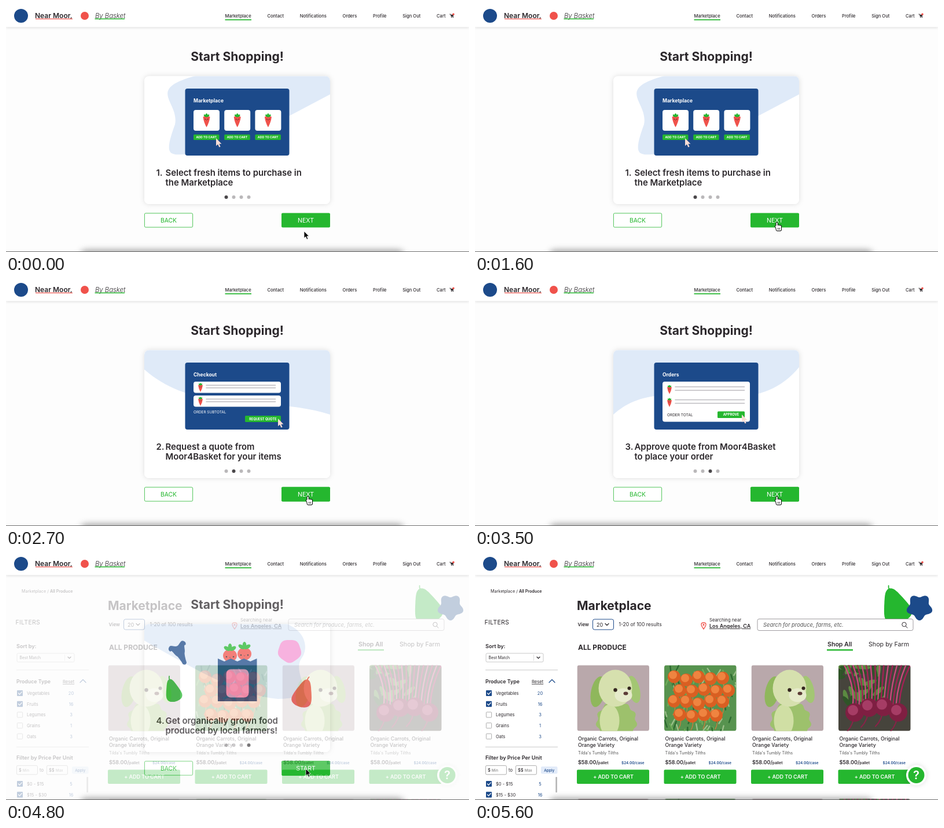
Recreate the animation shown at these times as an HTML page. Size 800 by 426 pixels, loop 5700 ms.

```html
<!DOCTYPE html>
<html lang="en">
<head>
<meta charset="utf-8">
<title>Shopping guide</title>
<style>
html, body { margin: 0; width: 100%; height: 100%; overflow: hidden; background: #fdfdfd; }
svg { display: block; width: 100vw; height: 100vh; font-family: Inter, "Open Sans", sans-serif; }
text { white-space: pre; }
.bar { filter: drop-shadow(0 1px 2px rgba(0,0,0,.14)); }
.card { filter: drop-shadow(0 0 4px rgba(0,0,0,.13)); }
.soft { filter: blur(6px); }
</style>
</head>
<body>
<svg id="stage" viewBox="0 0 800 426"></svg>
<script>
const GREEN = '#25b72f', NAVY = '#1c4a8a', RED = '#f0524b', SKY = '#dfeaf8', PINK = '#f598d5', INK = '#2b272b';
const { sin, cos, abs, min, max, sign, floor, PI } = Math;

// Drawing helpers
const range = n => [...Array(n).keys()];
const each = (list, fn) => (typeof list === 'number' ? range(list) : list).map(fn).join('');
const random = seed => abs(sin(seed * 12.9898) * 43758.5453) % 1;
const text = (x, y, size, weight, str, fill = INK, more = '') =>
  `<text x="${x}" y="${y}" font-size="${size}" font-weight="${weight}" fill="${fill}" ${more}>${str}</text>`;
const mid = (x, y, size, weight, str, fill) => text(x, y, size, weight, str, fill, 'text-anchor="middle"');
const box = (x, y, w, h, fill, r = 0, more = '') =>
  `<rect x="${x}" y="${y}" width="${w}" height="${h}" rx="${r}" fill="${fill}" ${more}/>`;
const frame = (x, y, w, h, stroke, r = 2, width = .8) =>
  box(x, y, w, h, '#fff', r, `stroke="${stroke}" stroke-width="${width}"`);
const path = (d, fill, more = '') => `<path d="${d}" fill="${fill}" ${more}/>`;
const line = (d, stroke, width = 1) =>
  path(d, 'none', `stroke="${stroke}" stroke-width="${width}" stroke-linecap="round" stroke-linejoin="round"`);
const oval = (x, y, rx, ry, fill, more = '') => `<ellipse cx="${x}" cy="${y}" rx="${rx}" ry="${ry}" fill="${fill}" ${more}/>`;
const dot = (x, y, r, fill, more) => oval(x, y, r, r, fill, more);
const put = (x, y, inner, turn = 0, scale = 1) =>
  `<g transform="translate(${x} ${y}) rotate(${turn}) scale(${scale})">${inner}</g>`;
const chevron = (x, y, w, stroke = INK, up = 1) =>
  line(`M${x - w} ${y - w * up / 2}l${w} ${w * up} ${w} ${-w * up}`, stroke, 1.2);

// Closed outlines traced from a function of the angle
const outline = fn => 'M' + range(90).map(i => fn(i / 45 * PI).map(v => v.toFixed(1))).join('L') + 'Z';
const ruffle = (r, wave, petals, fill) => path(outline(a => {
  const k = r + wave * sin(petals * a);
  return [k * cos(a), k * sin(a)];
}), fill);
const pear = (w, h, fill) => path(outline(a =>
  [w / 1.4 * sin(a) * (.68 - .34 * cos(a) + .1 * cos(2 * a)), -h / 2 * cos(a)]), fill) +
  line(`M0 ${2 - h / 2}q-1 -4 1 -7`, fill, 1.8);
const trumpet = (w, h, fill) => path(outline(a => {
  const open = ((1 + cos(a)) / 2) ** 2;
  return [w / 2 * (.2 + .8 * open) * sign(sin(a)) * min(1, 2 * abs(sin(a))), -h / 2 * cos(a) + 3 * open * cos(9 * a)];
}), fill);

// Small illustrations
const leaves = (y, size, spread) => each([-1, 0, 1], n =>
  put(0, y, oval(0, -size, size * .55, size, GREEN), n * spread));
const face = (w, y) => dot(-w, y, w / 6 + .3, INK) + dot(w, y, w / 6 + .3, INK) + line(`M-1 ${y + 1}q1 1.5 2 0`, INK, .6);
const carrot = (x, y, scale) => put(x, y,
  path('M-6-5Q0-9 6-5 5 4 0 13-5 4-6-5Z', RED) + leaves(-5, 3, 50) + face(2.2, -1), 0, scale);
const berry = (x, y) => put(x, y, oval(0, 2, 12, 11, RED) + leaves(-7, 6, 58) + face(6, 4));
const ARROW = 'M0 0V12L2.8 9.6 4.9 14.2 6.9 13.3 4.9 8.8H8.6Z';
const pointer = (x, y) => put(x, y, path(ARROW, '#f8ddd6'), 0, 1.1);
const handShape = each(4, i => box(2 + 2.1 * i, i ? 4 + i * .4 : 0, 2.2, 8, '#fff', 1.1)) +
  box(2, 7, 8.5, 7, '#fff', 2) + put(0, 6, box(0, 0, 2.4, 6, '#fff', 1.2), -25);
const hand = `<g stroke="#000" stroke-width="1.8">${handShape}</g>${handShape}` +
  each(3, i => line(`M${4.6 + 1.7 * i} 9.5v2.6`, '#000', .6));

// Tutorial slides
const panel = title => box(309.5, 143, 180, 116, NAVY, 4) + text(324, 167, 8.5, 700, title, '#fff');
const tag = (x, y, w, h, size, str) =>
  box(x, y, w, h, GREEN, 1.5) + mid(x + w / 2, y + h / 2 + size * .36, size, 700, str, '#fff');
const item = (y, gap) => carrot(336, y, .66) + each([-.5, .5], n => line(`M346 ${y - 1 + n * gap}H465.5`, '#bdbbc0', 1.6));
const bagTop = range(7).map(i => `${366 + i * 11.25} ${i % 2 ? 186 : 181}`).join('L');

const slides = [
  {
    blob: 'M327 121C240 145 300 165 292 205 270 265 285 258 320 256 400 250 440 216 490 190L560 153V121Z',
    art: panel('Marketplace') + each(3, i => {
      const x = 324 + 53.2 * i;
      return box(x, 180, 45, 36, '#fff', 4) + carrot(x + 22.5, 197, 1) + tag(x, 222.5, 44.5, 9.5, 5.2, 'ADD TO CART');
    }) + pointer(363, 229),
    lines: ['Select fresh items to purchase in', 'the Marketplace']
  },
  {
    blob: 'M239 155C330 235 450 198 560 233V121H239Z',
    art: panel('Checkout') +
      each([176, 200], y => box(324, y, 151, 19.5, '#fff', 4) + item(y + 9.5, 4.5)) +
      text(324, 231, 6.4, 400, 'ORDER SUBTOTAL', '#fff') +
      tag(413, 235, 62, 11, 5.6, 'REQUEST QUOTE') + pointer(470, 240),
    lines: ['Request a quote from', 'Moor4Basket for your items']
  },
  {
    blob: 'M239 233C330 150 470 260 560 151V121H239Z',
    art: panel('Orders') + box(324, 176, 151, 69.5, '#fff', 4) + item(189, 6) + item(211.5, 6) +
      text(332, 236, 6.5, 400, 'ORDER TOTAL') +
      tag(419, 227.5, 47, 11.5, 5.8, 'APPROVE') + pointer(461, 233),
    lines: ['Approve quote from Moor4Basket', 'to place your order']
  },
  {
    blob: 'M239 150C310 190 400 245 470 251 550 250 490 210 511 180 522 165 520 135 485 121H239Z',
    art: berry(387, 174) + berry(412, 171) + path(`M${bagTop}V255H366Z`, NAVY) + box(380.5, 199.5, 39, 49, PINK, 8) +
      put(302, 174, trumpet(36, 38, NAVY), -24) + put(288, 236, pear(28, 40, GREEN), -16) +
      put(490, 168, ruffle(19.8, .8, 5, PINK)) + put(514, 241, pear(35, 49, RED), 17),
    lines: ['Get organically grown food', 'produced by local farmers!']
  }
];

const slide = ({ blob, art, lines }, i) => `<g class="slide">` +
  box(239, 121.5, 321, 221.5, '#fff', 8) + path(blob, SKY, 'clip-path="url(#card)"') + art +
  text(259.5, 294, 14.9, 600, `${i + 1}.`) + each(lines, (s, n) => text(275.5, 294 + 17 * n, 14.9, 600, s)) +
  each(4, n => dot(380.5 + 13 * n, 331, 3, n === i ? '#4a474a' : '#bab8ba')) +
  box(476, 358.5, 84, 25, GREEN, 2) + mid(518, 375, 10.6, 400, i < 3 ? 'NEXT' : 'START', '#fff') + '</g>';

const tutorial = mid(399.5, 95, 21, 700, 'Start Shopping!') +
  box(239, 121.5, 321, 221.5, '#fff', 8, 'class="card"') +
  frame(239.4, 358.9, 83.2, 24.2, GREEN) + mid(281, 375, 10.4, 400, 'BACK', GREEN) +
  each(slides, slide);

// Product pictures, 125 by 114
const leafDog = box(0, 0, 125, 114, '#b9a8ab') +
  put(68, 98, ruffle(34, 2, 11, '#9dc16c')) + oval(56, 96, 17, 28, '#d0dfa4') +
  put(36, 46, oval(0, 0, 12, 27, '#8fb75c'), 12) + put(98, 42, oval(0, 0, 10, 24, '#a3c673'), -14) +
  oval(66, 40, 29, 32, '#d6e0ae') + oval(80, 52, 15, 12, '#e6ebcb') +
  dot(66, 43, 3.2, '#33251f') + dot(90, 40, 3, '#33251f') + oval(84, 49, 4, 3, '#5c3c37');

const roots = box(0, 0, 125, 114, '#57934f') +
  each(70, i => line(`M${125 * random(i)} ${114 * random(i + 90)}l${16 * random(i + 7) - 8} ${8 + i % 9}`, ['#9cc08a', '#2c6a30', '#6fae58'][i % 3], 2.4)) +
  each(19, i => {
    const row = floor(i / 5), x = 17 + i % 5 * 21 + row % 2 * 10, y = 20 + row * 21 + 6 * random(i);
    return line(`M${x} ${y}q4 14 -2 24`, '#d9783a', 1.2) + dot(x, y, 11, '#d95f22') + dot(x - 2, y - 3, 7, '#ef8440');
  });

const beets = box(0, 0, 125, 114, '#46443c') +
  each(40, i => put(75 * random(i), 70 * random(i + 50), oval(0, 0, 4, 12, i % 2 ? '#5b8a41' : '#2f5428'), 180 * random(i + 9))) +
  each(16, i => line(`M${24 + i * 5.4} 74Q${30 + i * 5} 40 ${10 + i * 7.6} 0`, i % 2 ? '#a81f56' : '#cf4a80', 2.2)) +
  each(4, i => {
    const x = 28 + 25 * i, y = 76 + 6 * cos(i * 2);
    return line(`M${x} ${y}q-2 22 -14 34`, '#8b2148', 2) + dot(x, y, 16, '#7f1f42') + dot(x - 3, y - 4, 9, '#a63c65');
  });

const product = (pic, i) => {
  const x = 176.5 + 150.5 * i, photo = `<g clip-path="url(#photo)">${pic}</g>`;
  return put(x, 192.5, photo) + put(x, 424, photo) +
    each(['Organic Carrots, Original', 'Orange Variety'], (s, n) => text(x + 1.5, 323 + 10.5 * n, 8.8, 500, s)) +
    text(x + 1.5, 347, 7.2, 400, "Tilda's Tumbly Tilths", '#555') +
    text(x + 1.5, 364, 9, 600, '$58.00/<tspan font-size="6.6">pallet</tspan>') +
    text(x + 76.5, 364, 6.4, 600, '$24.00/case', NAVY) +
    box(x - .5, 373.5, 125, 24.5, GREEN, 2) + mid(x + 62.5, 389, 9, 600, '+ ADD TO CART', '#fff');
};

// Marketplace page
const options = (top, checked, list) => each(list, ([label, count], i) => {
  const y = top + 18.7 * i;
  return (i < checked
    ? box(19, y - 5, 10, 10, NAVY, 1) + line(`M21.5 ${y}l2 2.2 3.8 -4.4`, '#fff', 1.3)
    : frame(19.4, y - 4.6, 9.2, 9.2, '#999', 1)) +
    text(36, y + 3, 7.5, 400, label) + mid(112.5, y + 3, 7.5, 400, count, NAVY);
});
const priceField = (x, unit, hint) => frame(x, 366.4, 36, 15.5, '#999') +
  text(x + 3.6, 377, 7.5, 500, `${unit} <tspan font-size="6.3" fill="#888">${hint}</tspan>`);
const UNDERLINE = 'text-decoration="underline"';

const sidebar = text(16.5, 122, 10.5, 400, 'FILTERS', INK, 'letter-spacing=".3"') +
  text(18, 163, 9.1, 600, 'Sort by:') + frame(19, 172, 99, 15, '#bbb') + text(23.5, 182, 6.9, 400, 'Best Match') +
  line('M101.5 174.5V184.5', '#ccc', .7) + chevron(109.5, 179.5, 2.5) +
  each([200, 333.5], y => box(18, y, 125, 1.6, '#dcdcdc')) +
  text(18, 224, 8.8, 600, 'Produce Type') + text(98, 224, 7.6, 400, 'Reset', INK, UNDERLINE) +
  chevron(133, 220, 5, NAVY, -1) +
  options(241, 2, [['Vegetables', 20], ['Fruits', 16], ['Legumes', 3], ['Grains', 1], ['Oats', 3]]) +
  text(18, 356, 9.1, 600, 'Filter by Price Per Unit') +
  priceField(18.4, '$', 'Min') + text(58, 376.5, 7.5, 400, 'to') + priceField(70.4, '$$', 'Max') +
  box(114, 368, 28.5, 12.5, '#e2ebf9', 2) + mid(128.2, 376.7, 6.5, 500, 'Apply', NAVY) +
  options(398, 2, [['$0 - $15', 5], ['$15 - $30', 16]]) + box(139.3, 386, 2.6, 27, '#b5b5b5', 1);

const market = box(0, 37, 800, 389, '#fff') + sidebar +
  text(27, 67, 7.2, 400, 'Marketplace /') + text(76, 67, 7.15, 600, 'All Produce') +
  text(176, 97, 21, 700, 'Marketplace') + text(177.5, 125, 8, 600, 'View') +
  frame(203.5, 113, 36, 18, NAVY, 3, 1) + text(210, 125.5, 9, 400, '20') + chevron(228, 122, 3) +
  text(248.5, 124.5, 8.5, 400, '1-20 of 100 results') +
  path('M395 130Q387 119 395 119T395 130Z', '#fff', `stroke="${RED}" stroke-width="1.3"`) + dot(395, 122.5, 1.5, RED) +
  text(405, 117, 7.7, 400, 'Searching near') + text(405, 128, 9, 600, 'Los Angeles, CA', INK, UNDERLINE) +
  put(726, 89, pear(49, 62, GREEN), -20) + put(768, 92, ruffle(20, 3, 5, NAVY)) +
  frame(488, 112.5, 269, 20, '#88858a', 3) +
  text(498, 126, 9.4, 400, 'Search for produce, farms, etc.', '#555', 'font-style="italic"') +
  dot(741.5, 122, 3.7, 'none', `stroke="${INK}"`) + line('M744.5 125l2.5 3', INK) +
  text(178, 166, 12, 700, 'ALL PRODUCE') + text(609, 160, 10.6, 600, 'Shop All') + box(608, 165, 45, 2.4, GREEN) +
  text(680, 160, 10.7, 400, 'Shop by Farm') +
  each([leafDog, roots, leafDog, beets], product) +
  dot(762.5, 383, 17.5, '#fff', 'class="card"') + dot(762.5, 383, 14, GREEN) + mid(762.5, 390, 20, 600, '?', '#fff');

const nav = box(0, -5, 800, 41.5, '#fff', 0, 'class="bar"') +
  dot(26, 17, 12, NAVY) + text(50, 21, 12, 600, 'Near Moor,') + box(51, 21.8, 64, 1.2, RED) +
  dot(136, 17, 7, RED) +
  text(154, 21, 11.3, 300, 'By Basket', INK, 'font-style="italic"') + box(153.5, 21.6, 51.5, 1.5, GREEN) +
  '<g id="menu">' + each(['Marketplace', 'Contact', 'Notifications', 'Orders', 'Profile', 'Sign Out', 'Cart'],
    s => text(0, 20, 7.6, 500, s)) + '</g>' + box(378.5, 23, 45.5, 1.7, GREEN) +
  line('M766.8 14.2h1.5l1 4h3.6', INK, .9) + path('M768.6 15h5l-.8 2.8h-3.4Z', INK) +
  dot(769.7, 19.5, .8, INK) + dot(772.5, 19.5, .8, INK) + dot(773, 14.2, 1.8, RED);

const stage = document.getElementById('stage');
stage.innerHTML = `<defs><clipPath id="card">${box(239, 121.5, 321, 221.5, '#fff', 8)}</clipPath>` +
  `<clipPath id="photo">${box(0, 0, 124.5, 114, '#fff', 4)}</clipPath></defs>` +
  box(0, 0, 800, 426, '#fdfdfd') + tutorial + `<g id="market">${market}</g>` + nav +
  box(128, 423, 560, 20, 'rgba(0,0,0,.4)', 10, 'class="soft"') + box(0, 425, 800, 1, '#6d6d6d') +
  `<g id="cursor">${path(ARROW, '#000', 'stroke="#fff" stroke-width=".8"')}<g>${hand}</g></g>`;

let menuX = 378.5;
for (const entry of document.getElementById('menu').children) {
  entry.setAttribute('x', menuX);
  menuX += entry.getComputedTextLength() + 27.7;
}

// Timeline
const LOOP = 5700, STEP = 100, FADE = 300, MARKET = 4700;
const slideStart = i => i ? 1600 + 1150 * (i - 1) : -FADE;
const ease = (t, start, length) => {
  const p = min(1, max(0, (t - start) / length));
  return p * p * (3 - 2 * p);
};
const layers = [...stage.querySelectorAll('.slide')];
const page = document.getElementById('market'), cursor = document.getElementById('cursor');
const [arrowPart, handPart] = cursor.children;

function draw() {
  const t = floor(performance.now() % LOOP / STEP) * STEP;
  layers.forEach((g, i) => g.setAttribute('opacity', ease(t, slideStart(i), FADE)));
  page.setAttribute('opacity', ease(t, MARKET, FADE));
  // The cursor climbs onto the button, then leaves through the bottom edge.
  const x = 515 + 6 * ease(t, 300, 500) - 3 * ease(t, 3600, 500);
  const y = 390 - 15 * ease(t, 300, 500) - 3 * ease(t, 3600, 500) + 70 * ease(t, 5000, 400);
  const over = y < 383 && t < MARKET;
  cursor.setAttribute('transform', `translate(${x - (over ? 2.5 : 0)} ${y})`);
  arrowPart.setAttribute('visibility', over ? 'hidden' : 'visible');
  handPart.setAttribute('visibility', over ? 'visible' : 'hidden');
  requestAnimationFrame(draw);
}
draw();
</script>
</body>
</html>
```
